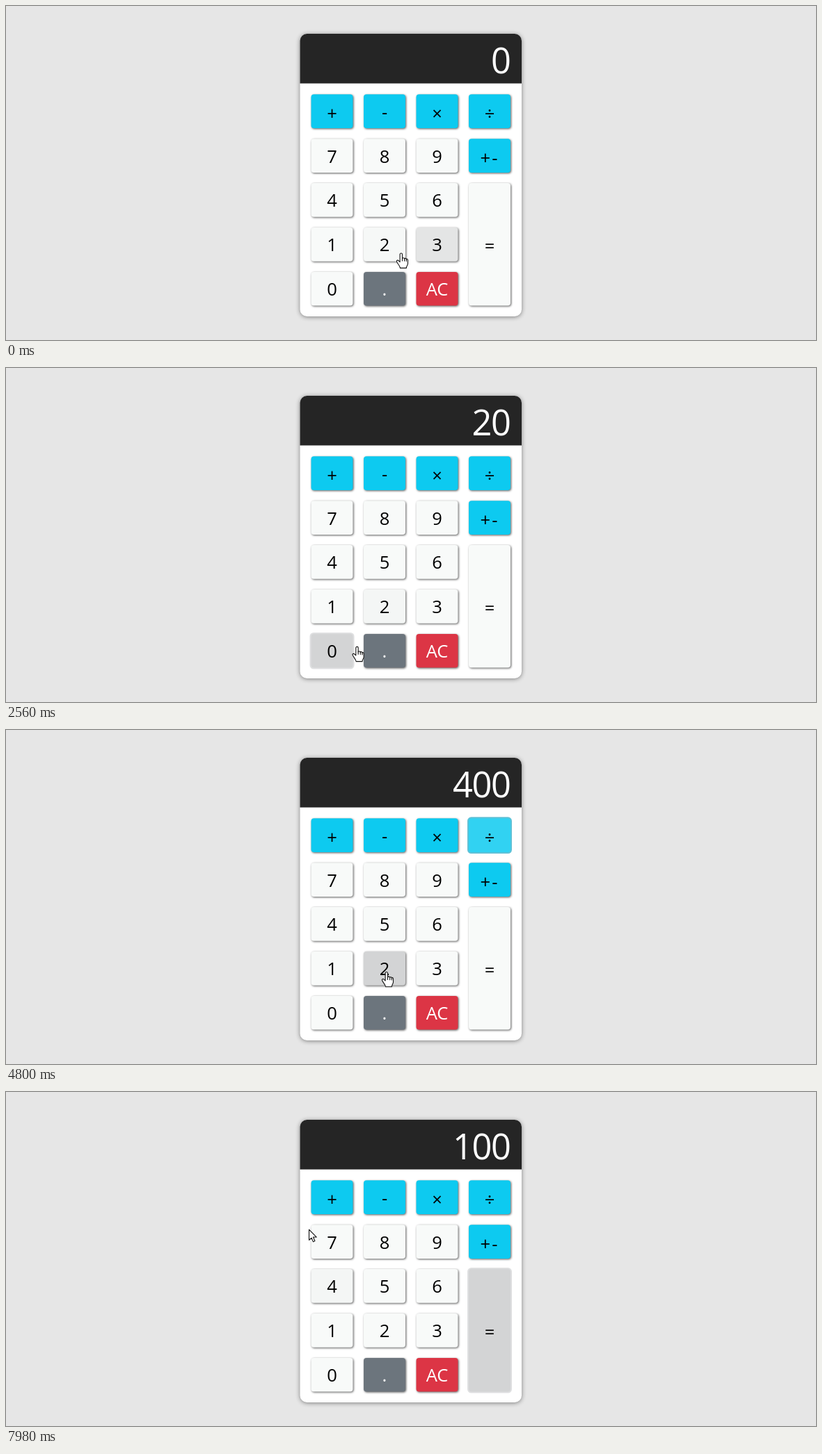
Recreate the animation shown at these times as an HTML page. Size 1164 by 481 pixels, loop 8 s.

```html
<!DOCTYPE html>
<html lang="en">
<head>
<meta charset="utf-8">
<title>Calculator</title>
<style>
html, body { margin: 0; width: 100%; height: 100%; overflow: hidden; background: #e6e6e6; }
svg { display: block; width: 100%; height: 100%; }
text { font-family: "Open Sans", "Noto Sans", sans-serif; font-size: 25.5px; text-anchor: middle; }
#display { font-size: 50.5px; text-anchor: end; letter-spacing: -1.4px; fill: #fff; }
.card { filter: drop-shadow(0.5px 1px 3px rgba(0, 0, 0, .45)); }
.raised { filter: drop-shadow(1.5px 1.5px 1.7px rgba(0, 0, 0, .65)); }
.cursor { fill: #fff; stroke: #111; stroke-width: 1.1; stroke-linejoin: round; stroke-linecap: round; }
</style>
</head>
<body>
<svg viewBox="0 0 1164 481">
  <rect class="card" x="422.5" y="40" width="318.5" height="407" rx="10" fill="#fff"/>
  <path d="M422.5 111.5V50a10 10 0 0 1 10-10H731a10 10 0 0 1 10 10v61.5z" fill="#252525"/>
  <text id="display" x="724.4" y="97.3">0</text>
  <g id="keys"></g>
  <circle id="flash" r="11" fill="#f2f000" fill-opacity=".6"/>
  <g id="pointer" class="cursor">
    <path id="arrow" d="M0 0V15.2L3.5 12 5.9 17.6 8.4 16.5 6 11H10.8Z"/>
    <g id="hand">
      <path d="M-1.8 12.5V1.6a1.7 1.7 0 0 1 3.4 0V7.4C2 6.2 4.5 6.2 4.7 7.9 5.2 6.8 7.2 7 7.4 8.6 8 7.7 9.6 8.1 9.6 9.8V14.5C9.6 17 7.6 18 7.4 21.2H-1.4C-1.5 18.4-5 15.4-6.3 12.2-7.2 10.2-5 9.2-3.6 10.8Z"/>
      <path d="M1.6 7.4v3.4M4.7 7.9v3.2M7.4 8.6v2.8" fill="none"/>
    </g>
  </g>
</svg>
<script>
const LOOP = 8000, FADE = 150, SAMPLES = 15, CURSOR_LAG = 15;
const $ = id => document.getElementById(id);
const show = (el, visible) => { el.style.display = visible ? '' : 'none'; };
const smooth = u => u * u * (3 - 2 * u);
const rgb = hex => [0, 2, 4].map(i => parseInt(hex.slice(i, i + 2), 16));
const mix = (a, b, k) => a.map((v, i) => v + (b[i] - v) * k);

function add(parent, tag, attrs) {
  const el = document.createElementNS('http://www.w3.org/2000/svg', tag);
  for (const name in attrs) el.setAttribute(name, attrs[name]);
  return parent.appendChild(el);
}

// Key colours: resting, hovered or focused, pressed.
const theme = (base, hot, down, ring, ink) =>
  ({ base: rgb(base), hot: rgb(hot), down: rgb(down), ring, ink });
const themes = {
  light: theme('f8faf9', 'd3d4d5', 'c8c9c9', 'rgba(200,202,203,.6)', '#000'),
  info: theme('0dcaf0', '31d2f2', '3dd5f3', 'rgba(11,160,192,.65)', '#000'),
  grey: theme('6c757d', '5c636a', '565e64', 'rgba(130,138,145,.5)', '#fff'),
  red: theme('dc3545', 'bb2d3b', 'b02a37', 'rgba(225,83,97,.5)', '#fff')
};
const themeOf = label => label === '.' ? 'grey' : label === 'AC' ? 'red'
  : /^[0-9=]$/.test(label) ? 'light' : 'info';

const keys = {};
['+ - × ÷', '7 8 9 +-', '4 5 6 =', '1 2 3', '0 . AC'].forEach((line, row) =>
  line.split(' ').forEach((label, col) => {
    const tall = label === '=', group = $('keys'), style = themes[themeOf(label)];
    const x = 438.5 + 75.5 * col, y = 127.3 + 63.9 * row, w = 60, h = tall ? 176.5 : 48.7;
    const ring = add(group, 'rect', { x: x - 2, y: y - 2, width: w + 4, height: h + 4, rx: 5.5, fill: style.ring });
    const face = add(group, 'rect', { x, y, width: w, height: h, rx: 4 });
    add(group, 'text', {
      x: x + w / 2, y: y + h / 2 + (/[+×÷=]/.test(label) ? 12 : 10), fill: style.ink,
      'letter-spacing': label === '+-' ? 2 : 0
    }).textContent = label;
    const aim = tall ? [x + 11, y + h * .6] : [x + w / 2 + 5, y + h / 2 + 7];
    keys[label] = { label, x, y, w, h, style, ring, face, aim };
  }));

// The pointer rests on a key from arrive to leave; bend curves the way there.
const stop = (label, arrive, leave, { press, bend = 0, shift = [0, 0] } = {}) =>
  ({ label, arrive, leave, press, bend, point: keys[label].aim.map((v, i) => v + shift[i]) });
const tour = [
  stop('3', -LOOP, -228),
  stop('2', 112, 240, { press: 150, bend: -.09 }),
  stop('0', 850, 1010, { press: 970 }),
  stop('×', 1350, 1465, { press: 1400 }),
  stop('2', 2000, 2120, { press: 2060, bend: .07 }),
  stop('0', 2400, 2460, { press: 2445 }),
  stop('=', 2860, 3500, { press: 2960, bend: -.03 }),
  stop('÷', 4167, 4340, { press: 4330, bend: -.26 }),
  stop('2', 4530, 4700),
  stop('4', 5715, 5830, { press: 5745 }),
  stop('=', 6280, 6690, { press: 6335 }),
  stop('8', 6990, 7010),
  stop('=', 7310, 7440),
  stop('7', 7980, LOOP, { bend: -.27, shift: [-38, -24.5] })
];

function tipAt(t) {
  const i = tour.findIndex(s => t <= s.leave), to = tour[i], from = tour[i - 1];
  if (!from || t >= to.arrive) return to.point;
  const u = (t - from.leave) / (to.arrive - from.leave);
  const [dx, dy] = [0, 1].map(k => to.point[k] - from.point[k]);
  const along = smooth(u), aside = to.bend * Math.sin(Math.PI * u);
  return [from.point[0] + dx * along - dy * aside, from.point[1] + dy * along + dx * aside];
}

const keyList = Object.values(keys);
const keyAt = ([x, y]) =>
  keyList.find(k => x >= k.x && x <= k.x + k.w && y >= k.y && y <= k.y + k.h);

const presses = tour.filter(s => s.press);
const focusAt = t => presses.filter(s => s.press <= t).pop();
const pressNear = (t, before, after) => presses.find(s => t > s.press - before && t < s.press + after);

function readout(t) {
  let shown = '0', stored = 0, operator = '', fresh = true;
  for (const { label, press } of presses) {
    if (press > t) break;
    if (/\d/.test(label)) {
      shown = fresh ? label : shown + label;
      fresh = false;
    } else {
      if (label === '=') shown = String(operator === '×' ? stored * shown : stored / shown);
      stored = +shown;
      operator = label;
      fresh = true;
    }
  }
  return shown;
}

// How long each key was hovered or focused within the fade time, from 0 to 1.
function heatAt(t) {
  const heat = new Map();
  for (let i = 0; i < SAMPLES; i++) {
    const past = t - (i + .5) * FADE / SAMPLES, focus = focusAt(past);
    for (const k of new Set([keyAt(tipAt(past)), focus && keys[focus.label]]))
      heat.set(k, (heat.get(k) || 0) + 1 / SAMPLES);
  }
  return heat;
}

function render(t) {
  const tip = tipAt(t), focus = focusAt(t), pressed = pressNear(t, 40, 115), heat = heatAt(t);
  for (const k of keyList) {
    const focused = !!focus && focus.label === k.label;
    const target = pressed && pressed.label === k.label ? k.style.down : k.style.hot;
    const colour = mix(k.style.base, target, smooth(heat.get(k) || 0));
    k.face.setAttribute('fill', `rgb(${colour.map(Math.round)})`);
    k.face.setAttribute('class', focused ? '' : 'raised');
    show(k.ring, focused);
  }
  $('display').textContent = readout(t - 50);

  const over = !!keyAt(tipAt(t - CURSOR_LAG));
  show($('hand'), over);
  show($('arrow'), !over);
  show($('flash'), !!pressNear(t, 60, 50));
  for (const id of ['pointer', 'flash']) $(id).setAttribute('transform', `translate(${tip})`);
}

const start = performance.now();
function tick() {
  render((performance.now() - start) % LOOP);
  requestAnimationFrame(tick);
}
tick();
</script>
</body>
</html>
```
